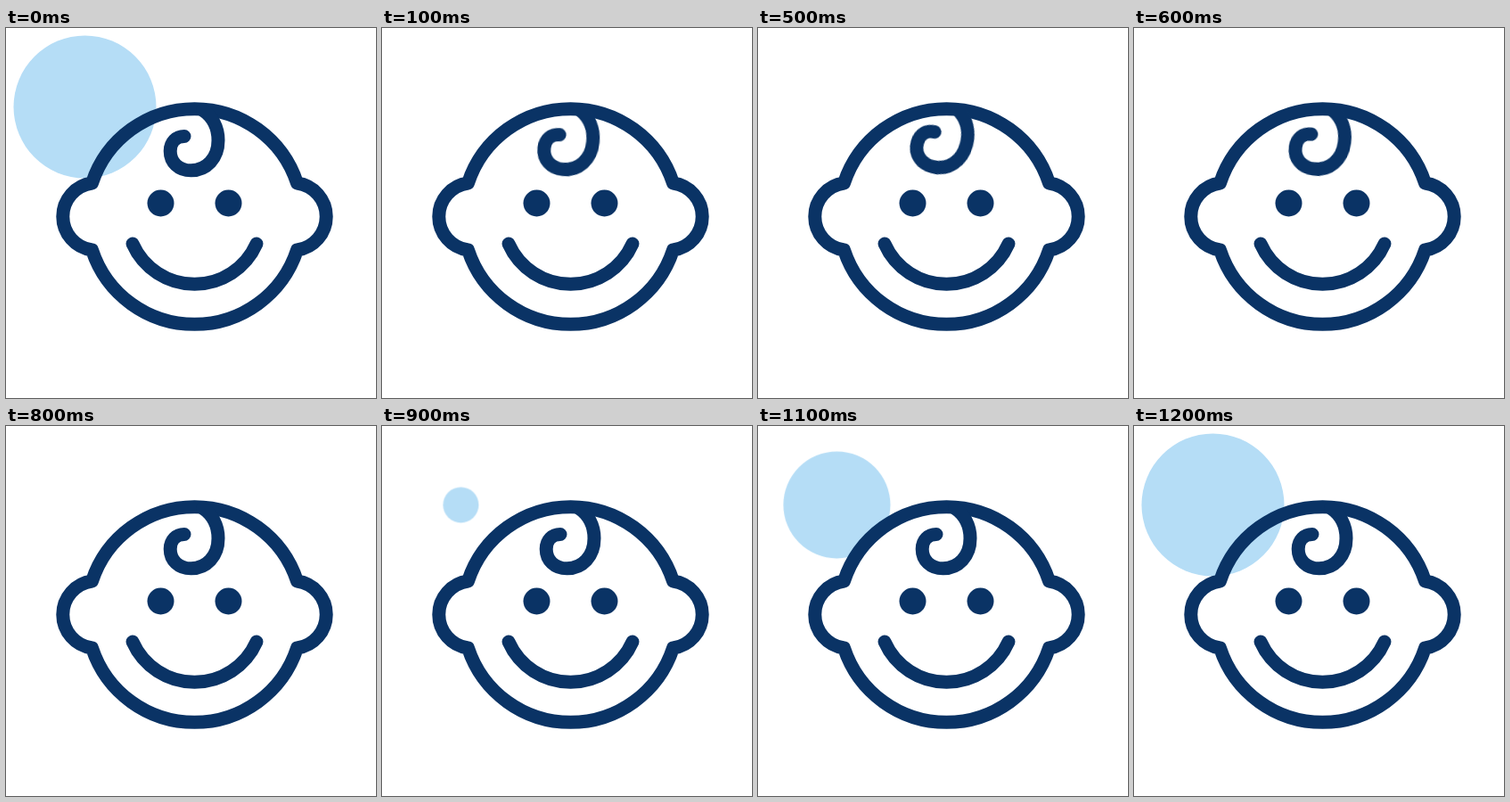
These frames come from a looping animation (415x415 px, 1.3 s). An HTML page without scripts:

```html
<!DOCTYPE html>
<html lang="en">
<head>
<meta charset="utf-8">
<title>Smiling baby</title>
<style>
  html, body { margin: 0; width: 100%; height: 100%; overflow: hidden; background: #fff; }
  svg { display: block; width: 100%; height: 100%; }
  .line { fill: none; stroke: #0a3365; stroke-width: 15; stroke-linecap: round; stroke-linejoin: round; }
  .eye { fill: #0a3365; }
  .bubble { fill: #b5ddf6; transform-origin: 88.5px 88.5px; animation: grow 1.3s infinite; }
  .curl { transform-origin: 218px 112px; animation: swing 1.3s infinite; }

  /* both motions advance once every 100 ms */
  @keyframes grow {
    0% { transform: scale(1); animation-timing-function: step-end; }
    7.692% { transform: scale(0); animation-timing-function: step-end; }
    61.538% { transform: scale(0); animation-timing-function: steps(4); }
    92.307%, 100% { transform: scale(1); }
  }
  @keyframes swing {
    0% { transform: rotate(0deg); animation-timing-function: steps(4); }
    30.769% { transform: rotate(22deg); animation-timing-function: steps(3); }
    53.846%, 100% { transform: rotate(0deg); }
  }
</style>
</head>
<body>
<svg viewBox="0 0 415 415">
  <circle class="bubble" cx="88.5" cy="88.5" r="80"/>
  <g class="line">
    <path d="M96.5 174 A121 121 0 0 1 326.5 174 A37.85 37.85 0 0 1 326.5 249 A121 121 0 0 1 96.5 249 A37.85 37.85 0 0 1 96.5 174 Z"/>
    <path d="M142 242 A76 76 0 0 0 281 242"/>
    <path class="curl" d="M220.5 92 C231 99 238 111 238 126 C238 146 225 159.8 207.5 159.8 C193.5 159.8 184.2 150.5 184.2 138 C184.2 128 191 121.5 200 121.5"/>
  </g>
  <circle class="eye" cx="173.5" cy="196.5" r="15"/>
  <circle class="eye" cx="249.5" cy="196.5" r="15"/>
</svg>
</body>
</html>
```
